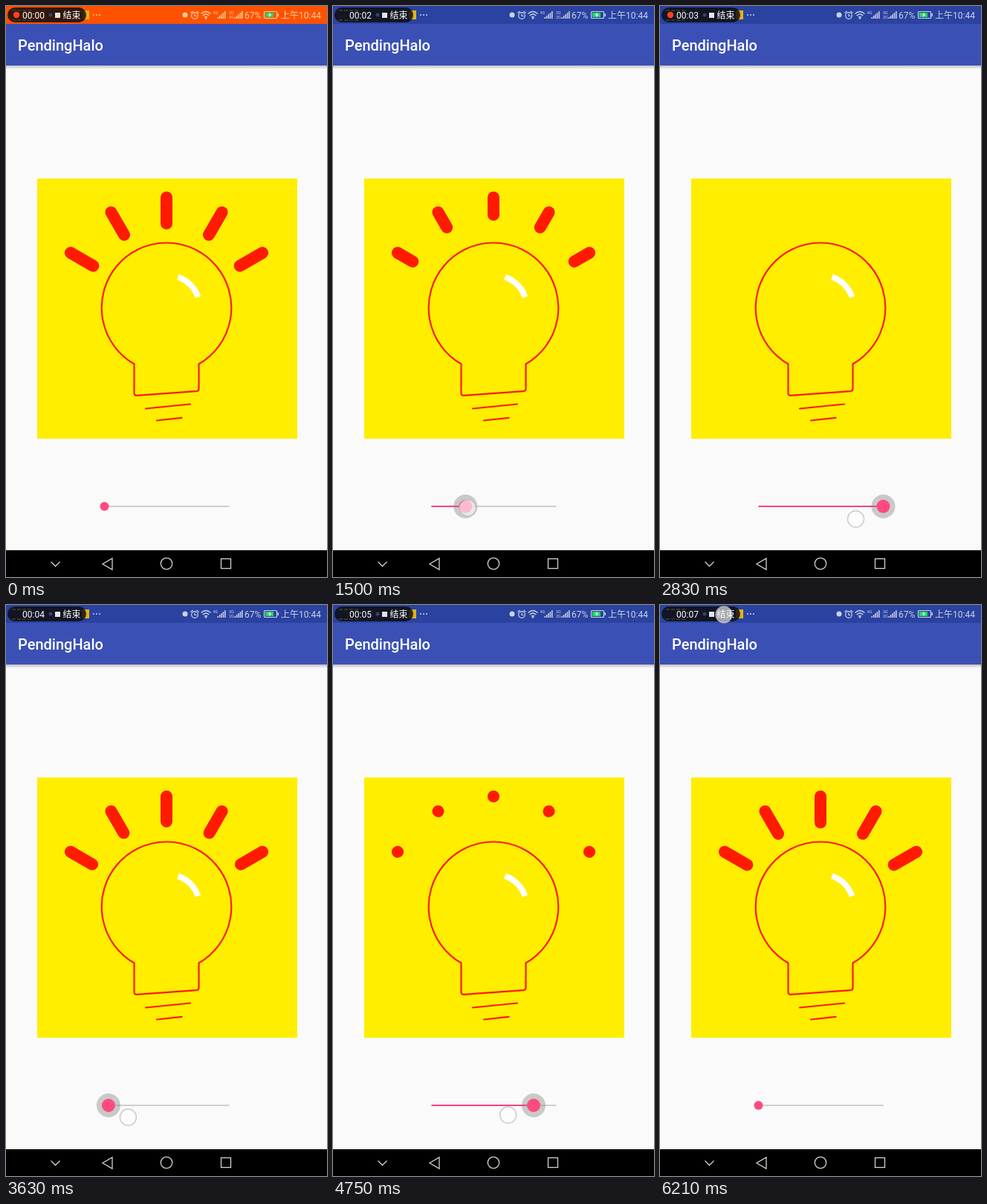
An HTML page that plays this animation: 432x768 px, repeating every 6.25 s.

```html
<!DOCTYPE html>
<html lang="zh">
<head>
<meta charset="utf-8">
<style>
  html, body { margin: 0; width: 100%; height: 100%; overflow: hidden; background: #fafafa; }
  svg { display: block; width: 432px; height: 768px; font-family: Roboto, "Noto Sans CJK SC", "Noto Sans CJK", sans-serif; }
</style>
</head>
<body>
<svg viewBox="0 0 432 768">
  <defs>
    <linearGradient id="shade" x2="0" y2="1">
      <stop stop-color="#808088" stop-opacity=".5"/>
      <stop offset="1" stop-color="#808088" stop-opacity="0"/>
    </linearGradient>
  </defs>
  <rect width="432" height="768" fill="#fafafa"/>
  <rect y="80" width="432" height="5" fill="url(#shade)"/>
  <rect y="24" width="432" height="56" fill="#3b50b5"/>
  <text x="16" y="60" font-size="20" font-weight="500" fill="#fff">PendingHalo</text>

  <!-- status bar -->
  <rect id="status" width="432" height="24"/>
  <rect x="102" y="6" width="10" height="12" fill="#e0b414"/>
  <rect x="2" y="2" width="106" height="20" rx="10" fill="#0c0c0c" fill-opacity=".84"/>
  <path d="M8 6H36M8 19H36" stroke="#3a3520" stroke-width="2" stroke-dasharray="5 2"/>
  <circle cx="60" cy="12" r="2.5" fill="#34446a"/>
  <circle id="rec" cx="14" cy="12" r="4.2" fill="#ff4322"/>
  <g font-size="12" fill="#fff">
    <text id="clock" x="22" y="16.5"></text>
    <text x="76.5" y="16.5">结束</text>
  </g>
  <rect x="66" y="9" width="7" height="7" fill="#e4e4e4"/>
  <g id="icons" fill="currentColor">
    <circle cx="118" cy="12" r="1"/><circle cx="122" cy="12" r="1"/><circle cx="126" cy="12" r="1"/>
    <circle cx="241" cy="12" r="3.5"/>
    <g fill="none" stroke="currentColor" stroke-width="1.2">
      <circle cx="254" cy="13" r="4.3"/>
      <path d="M254 10.5V13.5H256.5M248.5 9.5L251.5 7M259.5 9.5L256.5 7"/>
      <path d="M262.5 10.5Q269 4.5 275.5 10.5M264.7 13Q269 9 273.3 13M267 15.3Q269 13.5 271 15.3"/>
      <rect x="347.5" y="7.5" width="17" height="9" rx="1"/>
    </g>
    <circle cx="269" cy="16.5" r="1.2"/>
    <path d="M365.5 10H367V14H365.5Z"/>
    <path id="bars"/>
    <g font-size="5.5">
      <text x="278.5" y="11">4G</text>
      <text x="300" y="11">3G</text>
      <text x="300" y="17">2G</text>
    </g>
    <g font-size="12">
      <text x="321" y="16.5">67%</text>
      <text x="370" y="16.5">上午10:44</text>
    </g>
  </g>
  <rect x="349" y="9" width="11" height="6" fill="#20d860"/>
  <path d="M356 8.5L352.5 12.5H355L354 15.5L357.5 11.5H355Z" fill="#fff"/>

  <!-- bulb -->
  <rect x="42" y="232" width="350" height="350" fill="#ffee00"/>
  <g fill="none" stroke="#ff1a00" transform="translate(.5 .5)">
    <path id="rays" stroke-width="16" stroke-linecap="round"/>
    <path stroke-width="2.2" stroke-linecap="round" stroke-linejoin="round"
      d="M172 481A87.3 87.3 0 1 1 259 481V514Q259 517.3 256 517.6L175.5 523.3Q172 523.5 172 520ZM187.5 541L247.5 535M202.5 557L236 553.3"/>
    <path d="M231 364A45 45 0 0 1 258 391" stroke="#fff" stroke-width="8"/>
  </g>

  <!-- slider -->
  <g transform="translate(.5 0)">
    <path d="M132 673H300" stroke="#cfcfcf" stroke-width="2"/>
    <path id="done" stroke="#ff4081" stroke-width="2"/>
    <circle id="halo" cy="673" r="16" fill="#808080" fill-opacity=".4"/>
    <circle id="thumb" cy="673" fill="#ff4a80"/>
  </g>

  <!-- navigation bar -->
  <rect y="732" width="432" height="36"/>
  <g fill="none" stroke="#d2d2d2" stroke-width="1.3" transform="translate(.5 .5)">
    <path d="M60 747L66 753L72 747M142.5 742.5V757.5L129.5 750Z"/>
    <circle cx="215.5" cy="749.5" r="7.7"/>
    <rect x="289" y="743" width="13" height="13"/>
  </g>
  <circle id="touch" r="11" fill="#fff" fill-opacity=".62" stroke="#bcbcc4" stroke-opacity=".8" stroke-width="1.4"/>
</svg>
<script>
const LOOP = 6250, LAG = 70, PRESS = 640, RELEASE = 5400;
const LEFT = 132, RIGHT = 300;
const $ = id => document.getElementById(id);
const clamp = (v, a, b) => Math.min(b, Math.max(a, v));
const set = (id, attrs) => { for (const k in attrs) $(id).setAttribute(k, attrs[k]); };

// finger path: time, x, y
const path = [
  [640, 184, 691], [670, 184, 690], [1000, 178, 682], [1350, 174, 676],
  [1500, 181, 675], [1900, 312, 682], [2300, 332, 690], [2770, 314, 691],
  [2830, 264, 690], [3060, 150, 690], [3300, 122, 691], [3480, 124, 690],
  [3560, 137, 690], [3630, 164, 689], [3810, 230, 687], [4020, 304, 686],
  [4210, 306, 685], [4580, 306, 685], [4680, 270, 686], [4750, 236, 686],
  [5020, 135, 690], [5200, 122, 691], [RELEASE, 122, 691]
];

function finger(t) {
  t = clamp(t, PRESS, RELEASE);
  const i = path.findIndex((k, n) => n && k[0] >= t);
  const [a, b] = [path[i - 1], path[i]];
  const f = (t - a[0]) / (b[0] - a[0]);
  return [a[1] + (b[1] - a[1]) * f, a[2] + (b[2] - a[2]) * f];
}

function rays(p) {
  if (p > 0.97) return "";
  const inner = 149 - Math.max(0.01, 35 * (1 - p / 0.82));
  return [-60, -30, 0, 30, 60].map(deg => {
    const a = deg * Math.PI / 180;
    const at = r => (215.5 + r * Math.sin(a)).toFixed(2) + " " + (406 - r * Math.cos(a)).toFixed(2);
    return `M${at(149)}L${at(inner)}`;
  }).join("");
}

const signal = x => [2, 4, 6, 8, 10].map((h, i) => `M${x + i * 2.4} 17v${-h}h1.5v${h}z`).join("");
set("bars", { d: signal(284.5) + signal(307.5) });

function draw(t) {
  const orange = t < 200;
  set("status", { fill: orange ? "#ff5200" : "#2a42a0" });
  set("icons", { color: orange ? "#ffcf98" : "#ccd2e4" });
  $("clock").textContent = "00:0" + Math.floor((t + 900) / 1000);
  const blink = t % 1150;
  set("rec", { opacity: blink < 50 || blink >= 500 ? 1 : 0 });

  // the slider trails the finger slightly
  const late = t - LAG;
  const x = late < PRESS ? LEFT : clamp(finger(late)[0], LEFT, RIGHT);
  const grip = clamp((late - PRESS) / 120, 0, 1) * clamp((RELEASE + 200 - late) / 200, 0, 1);
  set("rays", { d: rays((x - LEFT) / (RIGHT - LEFT)) });
  set("done", { d: `M${LEFT} 673H${x}` });
  set("halo", { cx: x, opacity: grip });
  set("thumb", { cx: x, r: 6 + 3 * grip });

  const stopping = t >= 5960;
  const [fx, fy] = stopping ? [86, 19 - 6 * clamp((t - 5960) / 200, 0, 1)] : finger(t);
  set("touch", { cx: fx, cy: fy, opacity: stopping || t >= PRESS && t < RELEASE ? 1 : 0 });
}

const start = performance.now();
function tick() {
  draw((performance.now() - start) % LOOP);
  requestAnimationFrame(tick);
}
tick();
</script>
</body>
</html>
```
